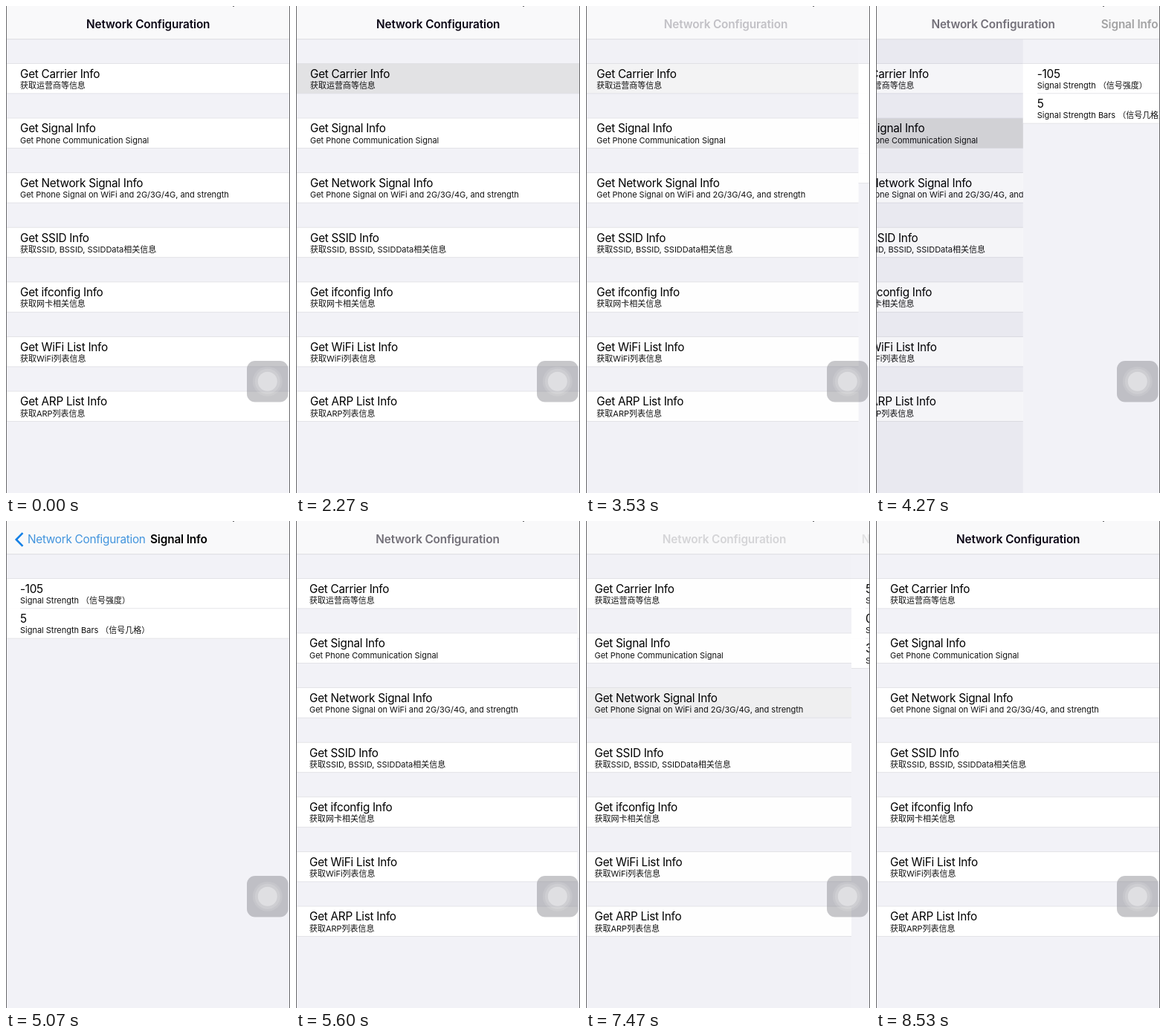
Animation, 382 px wide and 656 px high, one loop 8670 ms. Source, as an HTML page with a canvas:

```html
<!DOCTYPE html>
<html lang="zh-CN">
<head>
<meta charset="utf-8">
<title>Network Configuration</title>
<style>
  html, body { margin: 0; width: 100%; height: 100%; overflow: hidden; background: #f2f2f7; }
  canvas { display: block; }
</style>
</head>
<body>
<canvas id="stage" width="382" height="656"></canvas>
<script>
const W = 382, H = 656, LOOP = 8670, TICK = 1000 / 15;
const BAR = 45, TOP = 77.5, ROW = 40.3, PITCH = 73.6, INSET = 19;
const DECAY = 0.0105; // per ms, slide easing
const BAR_LAG = 10;   // ms the bar trails a page sliding in
const FAMILY = 'Inter, "Noto Sans CJK SC", "Noto Sans CJK", sans-serif';
const BLUE = '#1580e6', LABEL_BLUE = '#4294dd', GROUP = '#f2f2f7', LINE = '#dfdfe3', EDGE = '#6a6a6c';
const STYLES = {
  title: { font: `600 15.3px ${FAMILY}`, spacing: '-0.12px' },
  body: { font: `400 15.3px ${FAMILY}`, spacing: '-0.27px' },
  detail: { font: `400 11px ${FAMILY}`, spacing: '-0.02px' }
};

const menu = [
  ['Get Carrier Info', '获取运营商等信息'],
  ['Get Signal Info', 'Get Phone Communication Signal'],
  ['Get Network Signal Info', 'Get Phone Signal on WiFi and 2G/3G/4G, and strength'],
  ['Get SSID Info', '获取SSID, BSSID, SSIDData相关信息'],
  ['Get ifconfig Info', '获取网卡相关信息'],
  ['Get WiFi List Info', '获取WiFi列表信息'],
  ['Get ARP List Info', '获取ARP列表信息']
];

// Each visit: the menu row is pressed, its page slides in, later slides back out.
const visits = [
  { row: 0, press: 2264, pop: 3228, title: 'Carrier Info', rows: [
    ['星河通信', 'Carrier Name （运营商）'],
    ['460', 'Mobile Country Code （国家码）'],
    ['01', 'Mobile Network Code （网络码）'],
    ['cn', 'ISO Country Code （国家代码）']] },
  { row: 1, press: 4198, pop: 5150, title: 'Signal Info', rows: [
    ['-105', 'Signal Strength （信号强度）'],
    ['5', 'Signal Strength Bars （信号几格）']] },
  { row: 2, press: 6198, pop: 7207, title: 'Network Signal', rows: [
    ['5', 'SignalType 0:err,  1:2G,   2:3G,   3:4G,  4:LTE,   5:WiFi'],
    ['0', 'Signal Strength (信号强度)'],
    ['3', 'Signal Strength Bars （信号几格）']] }
];

const ctx = document.getElementById('stage').getContext('2d');
const clamp = v => Math.min(1, Math.max(0, v));
const mix = (a, b, k) => a + (b - a) * k;

function rect(x, y, w, h, color) {
  ctx.fillStyle = color;
  ctx.fillRect(x, y, w, h);
}

function text(str, x, y, style, color = '#000', alpha = 1) {
  ctx.globalAlpha = alpha;
  ctx.font = style.font;
  ctx.letterSpacing = style.spacing;
  ctx.fillStyle = color;
  ctx.fillText(str, x, y);
  ctx.globalAlpha = 1;
}

function cell([label, detail], x, y, highlight = 0) {
  rect(x, y, W, ROW, '#fff');
  if (highlight) rect(x, y, W, ROW, `rgba(217,217,219,${highlight})`);
  text(label, x + INSET, y + 19.3, STYLES.body);
  text(detail, x + INSET, y + 33.4, STYLES.detail, '#111');
}

function drawMenu(x, row, highlight) {
  rect(x, 0, W, H, GROUP);
  menu.forEach((item, i) => {
    const y = TOP + i * PITCH;
    cell(item, x, y, i === row ? highlight : 0);
    rect(x, y - 0.5, W, 0.8, LINE);
    rect(x, y + ROW - 0.3, W, 0.8, LINE);
  });
}

function drawPage(page, x) {
  rect(x, 0, W, H, GROUP);
  page.rows.forEach((item, i) => {
    const y = TOP + i * ROW;
    cell(item, x, y);
    rect(x + (i ? INSET : 0), y - 0.4, W, 0.8, LINE);
  });
  rect(x, TOP + page.rows.length * ROW - 0.4, W, 0.8, LINE);
}

function drawBar(s) {
  rect(0, 0, W, BAR, '#f9f9fa');
  rect(0, BAR - 0.6, W, 0.8, '#d5d5d9');
  const x = mix(108, 29, s.barOpen);
  text('Network Configuration', x, 30.4, STYLES.title, '#0a0514', s.rootAlpha);
  if (!s.visit) return;
  text('Network Configuration', x, 30.4, STYLES.body, LABEL_BLUE, s.backAlpha);
  text(s.visit.title, mix(383, 194, s.barOpen), 30.4, STYLES.title, '#000', s.pageAlpha);
  ctx.globalAlpha = s.backAlpha;
  ctx.strokeStyle = BLUE;
  ctx.lineWidth = 2.6;
  ctx.beginPath();
  ctx.moveTo(22.5, 16.2);
  ctx.lineTo(13.8, 25);
  ctx.lineTo(22.5, 33.8);
  ctx.stroke();
  ctx.globalAlpha = 1;
}

function drawFloatingButton() {
  ctx.fillStyle = 'rgba(112,112,118,.39)';
  ctx.beginPath();
  ctx.roundRect(324, 478, 55.5, 55.5, 11);
  ctx.fill();
  for (const [radius, alpha] of [[20, 0.1], [17, 0.14], [13, 0.36]]) {
    ctx.fillStyle = `rgba(255,255,255,${alpha})`;
    ctx.beginPath();
    ctx.arc(351.8, 505.7, radius, 0, Math.PI * 2);
    ctx.fill();
  }
}

const slideIn = ms => ms > 720 ? 1 : 1 - Math.exp(-DECAY * Math.max(0, ms));

function stateAt(t) {
  const visit = visits.find(v => t >= v.press && t < v.pop + 590);
  if (!visit) return { open: 0, barOpen: 0, rootAlpha: 1 };
  if (t < visit.pop) {
    const ms = Math.max(0, t - visit.press - 6);
    return {
      visit,
      open: slideIn(ms),
      barOpen: slideIn(ms - BAR_LAG),
      highlight: ms < 30 ? 0.75 : 1,
      rootAlpha: clamp(1 - ms / 143),
      pageAlpha: clamp(ms / 180),
      backAlpha: clamp((ms - 110) / 300)
    };
  }
  const ms = t - visit.pop;
  const open = Math.exp(-DECAY * ms);
  return {
    visit,
    open,
    barOpen: open,
    highlight: clamp(1 - ms / 430),
    rootAlpha: clamp((ms - 100) / 490) ** 1.7,
    pageAlpha: clamp(1 - ms / 285),
    backAlpha: clamp(1 - ms / 250)
  };
}

function render(t) {
  const s = stateAt(t);
  const edge = W * (1 - s.open);
  drawMenu(-0.3 * W * s.open, s.visit?.row, s.highlight);
  if (s.visit) {
    rect(0, 0, edge, H, `rgba(15,10,70,${0.08 * s.open})`);
    drawPage(s.visit, edge);
  }
  drawBar(s);
  drawFloatingButton();
  rect(0, 0, 1, H, EDGE);
  rect(W - 1, 0, 1, H, EDGE);
  rect(305, 0, 2, 1, EDGE);
}

function loop() {
  const t = performance.now() % LOOP;
  render(Math.floor((t + 4) / TICK) * TICK);
  requestAnimationFrame(loop);
}
loop();
</script>
</body>
</html>
```
